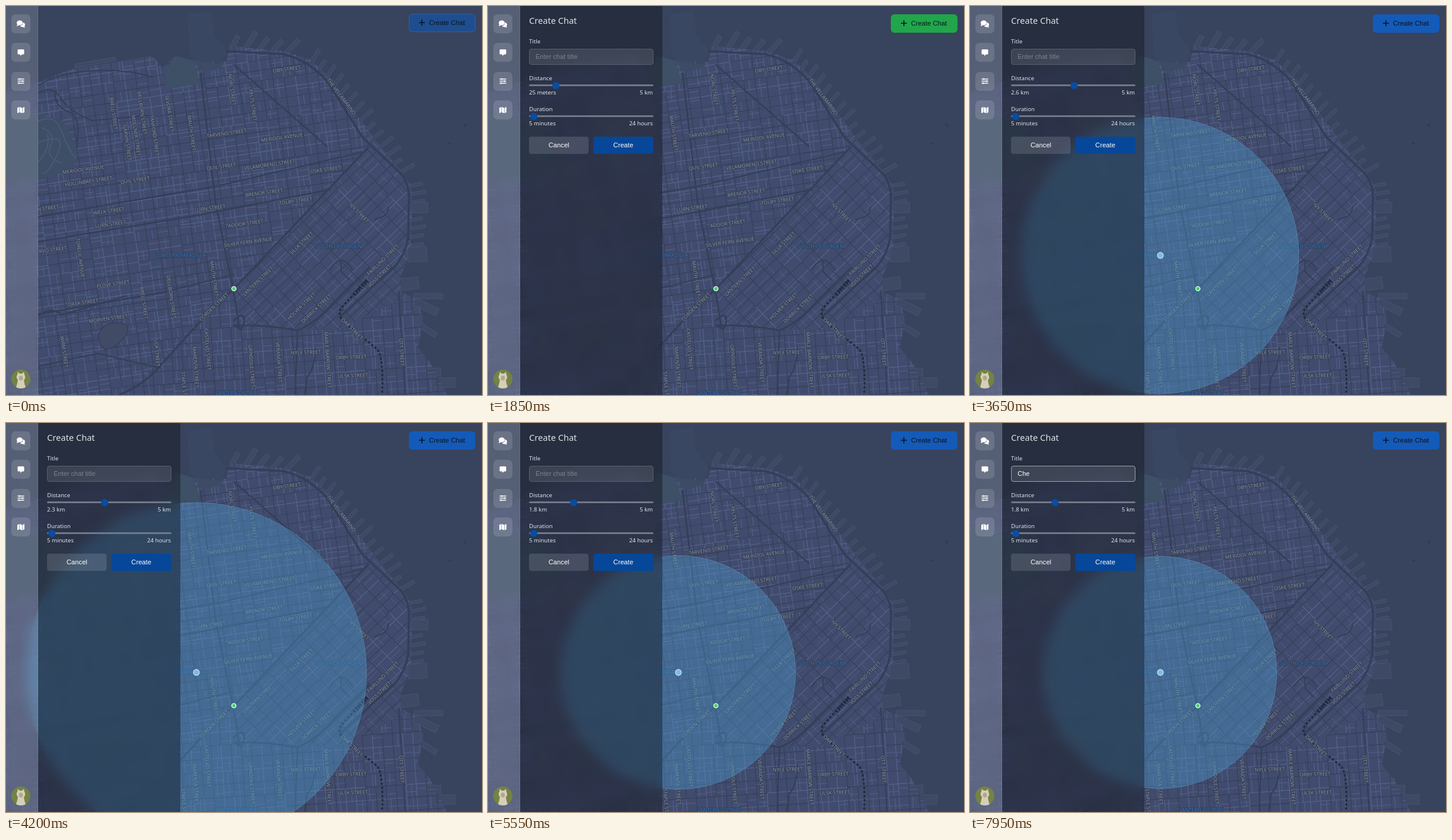
An HTML page with a canvas that plays this animation: 800x655 px, repeating every 8 s.

```html
<!DOCTYPE html>
<html lang="en">
<head>
<meta charset="utf-8">
<title>Create Chat</title>
<style>
html, body { margin: 0; width: 100%; height: 100%; overflow: hidden; background: #38435d; }
#stage { position: relative; width: 800px; height: 655px; overflow: hidden; color: #e0e3e8; font: 9.6px/14px "Noto Sans", "Open Sans", sans-serif; }
#stage * { position: absolute; box-sizing: border-box; white-space: nowrap; }
#side { left: 0; top: 0; width: 54px; height: 655px; background: rgba(255,255,255,.15); border-right: 1px solid rgba(255,255,255,.1); backdrop-filter: blur(10px); }
#panel { left: 54px; top: 0; width: 239px; height: 655px; background: rgba(13,15,20,.4); backdrop-filter: blur(10px); }
#panel > * { left: 15px; }
#panel > .right { left: auto; right: 16px; }
h1 { margin: 0; top: 14px; font-size: 14.6px; line-height: 20px; font-weight: 500; }
.tile { left: 9px; width: 32px; height: 32px; border-radius: 7px; background: rgba(255,255,255,.13); }
.tile svg { left: 8px; top: 8px; }
#avatar { left: 9px; top: 612px; }
#field { top: 72px; width: 208.6px; height: 27px; padding-left: 10px; border: 1px solid; border-radius: 4px; background: rgba(255,255,255,.11); font: 11px/25px "Liberation Sans", Arial, sans-serif; }
#caret { left: 10px; top: 6px; width: 1px; height: 13px; background: #fff; }
.track { width: 208.6px; height: 3px; border-radius: 2px; background: #727886; }
.knob { width: 12px; height: 12px; border-radius: 50%; background: #084da3; }
.btn { top: 220px; width: 100.4px; height: 29px; border-radius: 4px; color: #fff; text-align: center; font: 11.2px/29px "Liberation Sans", Arial, sans-serif; }
#open { left: 677px; width: 112px; height: 31px; border-radius: 6px; color: #0b1220; font: 11.2px/31px "Liberation Sans", Arial, sans-serif; }
#open span { left: 34px; top: 0; }
#open svg { left: 16px; top: 9px; }
</style>
</head>
<body>
<div id="stage">
  <canvas id="map" width="800" height="655"></canvas>
  <svg width="800" height="655">
    <g id="area">
      <circle id="disc" cx="320" cy="420" fill="rgba(76,152,202,.4)" stroke="#5a91b9" stroke-opacity=".6"/>
      <circle cx="320" cy="420" r="5" fill="#83b9e0" stroke="#c4dced" stroke-width="1.3"/>
    </g>
    <circle cx="383" cy="476" r="3.6" fill="#43d16c" stroke="#eefaf1" stroke-width="1.4"/>
  </svg>
  <div id="panel">
    <h1>Create Chat</h1>
    <span style="top:53px">Title</span>
    <div id="field"><span id="typed"></span><i id="caret"></i></div>
    <span style="top:115px">Distance</span>
    <div class="track" style="top:132px"></div>
    <div class="knob" id="knob" style="top:128px"></div>
    <span id="reach" style="top:139px"></span><span class="right" style="top:139px">5 km</span>
    <span style="top:167px">Duration</span>
    <div class="track" style="top:184px"></div>
    <div class="knob" style="top:180px;left:17px"></div>
    <span style="top:191px">5 minutes</span><span class="right" style="top:191px">24 hours</span>
    <div class="btn" style="background:rgba(255,255,255,.13)">Cancel</div>
    <div class="btn" style="left:123.2px;background:#064799">Create</div>
  </div>
  <div id="side">
    <div class="tile" style="top:14px"><svg width="16" height="16" fill="#fff"><ellipse cx="6" cy="6.3" rx="5" ry="4"/><path d="M2 8L1 12L6 10ZM11.5 5.5Q15 6.5 15 9.5Q15 11 14 12L15 14.5L11.5 13.5Q8 13.7 6.5 11.5Q11.5 11 11.5 5.5Z"/></svg></div>
    <div class="tile" style="top:62px"><svg width="16" height="16" fill="#fff"><path d="M4 3H12Q13.5 3 13.5 4.5V10Q13.5 11.5 12 11.5H10L7 14V11.5H4Q2.5 11.5 2.5 10V4.5Q2.5 3 4 3Z"/></svg></div>
    <div class="tile" style="top:111px"><svg width="16" height="16" stroke="#fff" stroke-width="1.3"><path d="M2.5 4H13.5M2.5 7.5H13.5M2.5 11H13.5M6 2.6V5.4M11 6.1V8.9M5 9.6V12.4"/></svg></div>
    <div class="tile" style="top:159px"><svg width="16" height="16" fill="#fff"><path d="M2 4.5L5.3 3V12L2 13.5ZM6 3L10 4.5V13.5L6 12ZM10.7 4.5L14 3V12L10.7 13.5Z"/></svg></div>
    <svg id="avatar" width="32" height="32"><circle cx="16" cy="16" r="16" fill="#748344"/><path d="M8 30Q10 24 11 18Q7 13 10 9L11 4L14 7L18 7L21 4L22 9Q25 14 21 18Q22 25 24 30Q16 34 8 30Z" fill="#d5cfba"/><ellipse cx="16" cy="14.5" rx="3.4" ry="4" fill="#b5a68c"/></svg>
  </div>
  <div id="open"><svg width="12" height="12" stroke="#0b1220" stroke-width="1.6"><path d="M1 6H11M6 1V11"/></svg><span>Create Chat</span></div>
</div>
<script>
const $ = id => document.getElementById(id);
const c = $('map').getContext('2d');
const rad = Math.PI / 180;
let seed = 7;
const rnd = () => (seed = seed * 16807 % 2147483647) / 2147483647;

const LIGHT = '#54648d', DARK = '#343e58';
const land = new Path2D('M0 146L54 129L110 106L186 94L246 84L263 104L285 84L315 92L370 94L376 66L400 70L468 76L512 91L549 124L590 184L626 232L664 278L682 305L681 408L664 455L664 482L688 492L702 525L692 575L713 600L742 655H0Z');
const fill = (d, color) => { c.fillStyle = color; c.fill(new Path2D(d)); };
function road(d, width = 2.4, color = DARK, dash = []) {
  c.strokeStyle = color;
  c.lineWidth = width;
  c.setLineDash(dash);
  c.stroke(new Path2D(d));
  c.setLineDash([]);
}

// Street grid inside an area, built on two skewed axes.
function grid(area, ox, oy, a, b, du, dv, bold) {
  c.save();
  c.clip(land);
  c.clip(new Path2D(area));
  c.transform(Math.cos(a * rad), Math.sin(a * rad), Math.cos(b * rad), Math.sin(b * rad), ox, oy);
  const span = 640;
  const line = (across, p, from, to) => {
    c.beginPath();
    across ? (c.moveTo(from, p), c.lineTo(to, p)) : (c.moveTo(p, from), c.lineTo(p, to));
    c.stroke();
  };
  const each = (step, draw) => { for (let i = -Math.ceil(span / step); i * step < span; i++) draw(i); };
  const axes = [[true, dv, du], [false, du, dv]];
  c.strokeStyle = LIGHT;
  for (const [across, step, other] of axes) {
    each(step, i => {
      c.lineWidth = 1.2;
      line(across, i * step, -span, span);
      c.lineWidth = .9;
      each(other, j => {
        if (rnd() < .5) line(across, (i + .25 + rnd() * .5) * step, j * other, (j + 1) * other);
      });
    });
  }
  // Darker streets run in stretches of a few blocks, arterials all the way.
  c.strokeStyle = DARK;
  for (const [across, step, other] of axes) {
    each(step, i => {
      c.lineWidth = 1.4;
      if (i % bold === 0) return line(across, i * step, -span, span);
      each(other * 4, j => {
        if (rnd() < .45) line(across, i * step, j * other * 4, (j + 1) * other * 4);
      });
    });
  }
  c.restore();
}

function drawMap() {
  c.fillStyle = '#38435d';
  c.fillRect(0, 0, 800, 655);
  c.fillStyle = '#414b6d';
  c.fill(land);
  fill('M305 14L346 7L350 48L372 76L362 98L326 99L308 83Z', '#3a4762');

  // Piers along the eastern shore
  c.fillStyle = '#3e4965';
  c.strokeStyle = '#495674';
  c.lineWidth = .8;
  const pier = (x, y, angle, w, h) => {
    c.save();
    c.translate(x, y);
    c.rotate(angle * rad);
    c.fillRect(0, 0, w, h);
    c.strokeRect(0, 0, w, h);
    c.restore();
  };
  for (let i = 0; i < 5; i++) pier(376 + i * 23, 68 + i * 2, -62 + i * 4, 22 + rnd() * 12, 8);
  for (let i = 0; i < 14; i++) pier(510 + i * 11.5, 94 + i * 14.2, -58 + i * 2.2, 16 + rnd() * 19, 6);
  for (let i = 0; i < 9; i++) pier(680, 300 + i * 14.5, -10, 14 + rnd() * 12, 5);
  pier(680, 331, 0, 29, 17);
  pier(675, 406, -2, 32, 25);
  pier(660, 460, -8, 32, 20);
  pier(686, 484, 0, 48, 9);
  pier(690, 492, 25, 42, 13);
  pier(697, 533, 32, 34, 9);
  pier(705, 610, 0, 26, 13);
  pier(720, 626, 0, 35, 16);
  pier(115, 98, -10, 70, 6);
  fill('M742 229L748 231L745 234ZM768 198L774 200L771 204Z', '#303b52');

  grid('M0 0H650L605 245L383 476L200 655H0Z', 383, 476, -8.5, 82, 19, 17, 3);
  grid('M605 245L383 476L395 540L490 545L560 545L690 480L800 300L650 0Z', 383, 476, -44, 46, 27, 17, 2);
  grid('M383 476L395 540L490 545L560 545L690 480H800V655H200Z', 395, 540, -4, 86, 17, 22, 3);

  fill('M0 176L60 185L94 191L121 243L112 274L54 294H0Z', '#3e4e67');
  fill('M266 108L286 84L314 92L327 130L270 139Z', '#3d5065');
  fill('M156 554Q160 535 182 534Q208 530 204 550Q190 574 168 578Q153 572 156 554Z', '#414b66');
  fill('M314 92L364 98L361 105L330 112Z', '#3d4c64');
  road('M156 554Q160 535 182 534Q208 530 204 550Q190 574 168 578Q153 572 156 554Z', 1.4);
  road('M54 194Q82 180 93 210T118 258M54 230Q105 210 86 250T60 280M60 205Q85 215 75 235T95 265M54 262Q75 240 70 215', 1.2, '#50607f');

  // Main roads
  road('M54 134Q88 112 146 109T247 120M54 146Q80 133 92 155T145 193L240 184M82 145Q82 170 105 178T118 238', 2);
  road('M370 76L465 81Q508 90 541 128L599 221L657 276Q680 294 677 335L676 390Q670 422 650 442L560 525', 3.6);
  road('M382 98L540 237', 2.4);
  road('M327 112L352 330L386 500L392 543', 2.6);
  road('M54 397L330 351L545 309M54 355L350 304L603 245M54 519L265 482L383 452', 2.3);
  road('M610 237L383 476L323 535L257 608Q233 637 190 655', 3.2);
  road('M382 538Q430 536 490 546Q520 535 553 497L611 440M386 538Q397 552 400 532T382 530', 2.8);
  road('M54 522Q75 505 94 520L202 488M54 607L154 585L260 610M490 546L486 655M520 575Q520 608 506 625L502 655M660 480L671 655', 2.2);
  road('M544 445Q563 411 583 445M563 427V447L578 462M618 360Q644 354 643 337', 2);
  road('M605 463L563 509Q556 522 571 535L624 578Q635 591 632 655', 3.2, '#222b3d', [4, 3]);
  road('M585 486L607 462', 7, '#222b3d', [2.5, 2.5]);

  c.textAlign = 'center';
  c.textBaseline = 'middle';
  c.lineJoin = 'round';
  c.font = '8.4px "Open Sans", "Noto Sans", sans-serif';
  const names = (angle, color, list) => list.forEach(([text, x, y]) => {
    c.save();
    c.translate(x, y);
    c.rotate(angle * rad);
    c.strokeStyle = '#353e55';
    c.lineWidth = 2.2;
    c.strokeText(text, 0, 0);
    c.fillStyle = color;
    c.fillText(text, 0, 0);
    c.restore();
  });
  const gray = '#929aab';
  const streets = (angle, list) => names(angle, gray, list.map(([name, x, y]) => [name + ' STREET', x, y]));
  streets(-8, [['OBY', 472, 107], ['TARVENO', 371, 215], ['HOLLINBREY', 139, 296], ['QUIL', 217, 294], ['QUIL', 362, 271],
    ['VELAMORENO', 443, 268], ['OSKE', 537, 276], ['BRENOR', 434, 315], ['TOLBY', 487, 329], ['WELK', 173, 346],
    ['LURN', 176, 368], ['LURN', 343, 341], ['ADDOR', 403, 367], ['RVO', 79, 411], ['N', 71, 341],
    ['PLOVE', 180, 469], ['DASK', 130, 500], ['MORVEN', 172, 527]]);
  names(-8, gray, [['MERIDOL AVENUE', 464, 222], ['MERIDOL AVENUE', 130, 276], ['SILVER FERN AVENUE', 407, 398]]);
  streets(-2, [['NYLE', 504, 584], ['ORBY', 580, 592], ['ULSK', 583, 623]]);
  streets(82, [['BRELL', 180, 181], ['GARVIN', 203, 230], ['MOLLNER', 218, 218], ['DELLBORN', 228, 180], ['TANFORD', 249, 218],
    ['SEVORA', 274, 181], ['MAUTH', 311, 214], ['MAUTH', 349, 459], ['NORL', 379, 141], ['PELTS', 414, 167],
    ['BRELL', 231, 500], ['DELLBORN', 277, 490], ['WIRM', 97, 582]]);
  names(82, gray, [['TORELIC AVENUE', 124, 424]]);
  streets(86, [['ULA', 253, 584], ['MARENTA', 318, 608], ['CASTELVO', 338, 578], ['STAPLE', 299, 645], ['GRINDOLE', 412, 606],
    ['VERANDA', 458, 600], ['MARLE BARROW', 540, 596], ['OTT', 664, 583]]);
  streets(-44, [['SILLA', 497, 400], ['CORDEN', 350, 507], ['LANTERN', 424, 464], ['HOLVER', 497, 506], ['DORRICK', 522, 510],
    ['FAIRLUND', 634, 428], ['VOSS', 628, 455]]);
  streets(45, [['IVY', 593, 349], ['OAR', 581, 544]]);
  names(53, gray, [['THE VELLAMARINO', 563, 153]]);
  names(0, '#3277c6', [['LOWTERN PARADISE', 291, 421], ['SOUTH OF CORDEN', 559, 406], ['LANTERN DISTRICT', 389, 653]]);
}

// Smooth curve through [time, value] points.
function curve(points, t) {
  const n = points.length;
  if (t <= points[0][0]) return points[0][1];
  if (t >= points[n - 1][0]) return points[n - 1][1];
  const i = points.findIndex(p => p[0] > t) - 1;
  const slope = k => {
    const [p, q] = [points[Math.max(k - 1, 0)], points[Math.min(k + 1, n - 1)]];
    return (q[1] - p[1]) / (q[0] - p[0]);
  };
  const [t0, v0] = points[i], [t1, v1] = points[i + 1];
  const h = t1 - t0, u = (t - t0) / h, w = 1 - u;
  return w * w * (1 + 2 * u) * v0 + u * u * (3 - 2 * u) * v1 + h * u * w * (w * slope(i) - u * slope(i + 1));
}
const ramp = (t, from, to) => {
  const u = Math.min(1, Math.max(0, (t - from) / (to - from)));
  return u * u * (3 - 2 * u);
};
const mix = (a, b, u) => `rgb(${a.map((v, i) => Math.round(v + (b[i] - v) * u))})`;

const knobPath = [[3150, 114], [3300, 137.2], [3500, 160], [3700, 178], [3900, 184], [4200, 166], [4450, 140], [4700, 127], [4900, 125], [5200, 135], [5500, 143.3], [5650, 143.3]];
const radiusPath = [[3100, 0], [3300, 88], [3600, 215], [3800, 272], [4000, 300], [4200, 286], [4450, 230], [4700, 165], [4900, 148], [5200, 169], [5500, 195.5], [5650, 195.5]];
const dim = [30, 78, 143], blue = [20, 90, 184], green = [33, 167, 74];

function draw(t) {
  const lit = ramp(t, 200, 1050);
  const open = $('open').style;
  open.background = t < 1850 ? mix(dim, green, lit) : mix(green, blue, ramp(t, 1800, 2600));
  open.boxShadow = `inset 0 0 0 1px rgba(130,160,210,${.2 * (1 - lit)})`;
  open.top = 13 + lit + 'px';
  $('panel').style.display = t < 1850 ? 'none' : '';

  const x = curve(knobPath, t);
  $('knob').style.left = x - 60 + 'px';
  $('reach').textContent = t < 3150 ? '25 meters' : ((x - 74.5) / 39.2).toFixed(1) + ' km';
  $('area').style.display = t < 3150 ? 'none' : '';
  $('disc').setAttribute('r', Math.max(0, curve(radiusPath, t)));

  const text = t < 7450 ? '' : t < 7800 ? 'C' : t < 7900 ? 'Ch' : 'Che';
  $('typed').textContent = text || 'Enter chat title';
  $('typed').style.color = text ? '#fff' : '#7b8290';
  $('field').style.borderColor = mix([88, 95, 110], [156, 161, 172], ramp(t, 6400, 6550));
  $('caret').style.display = t >= 6500 && t < 7000 ? '' : 'none';
}

drawMap();
const start = performance.now();
function tick() {
  draw((performance.now() - start) % 8000);
  requestAnimationFrame(tick);
}
tick();
</script>
</body>
</html>
```
